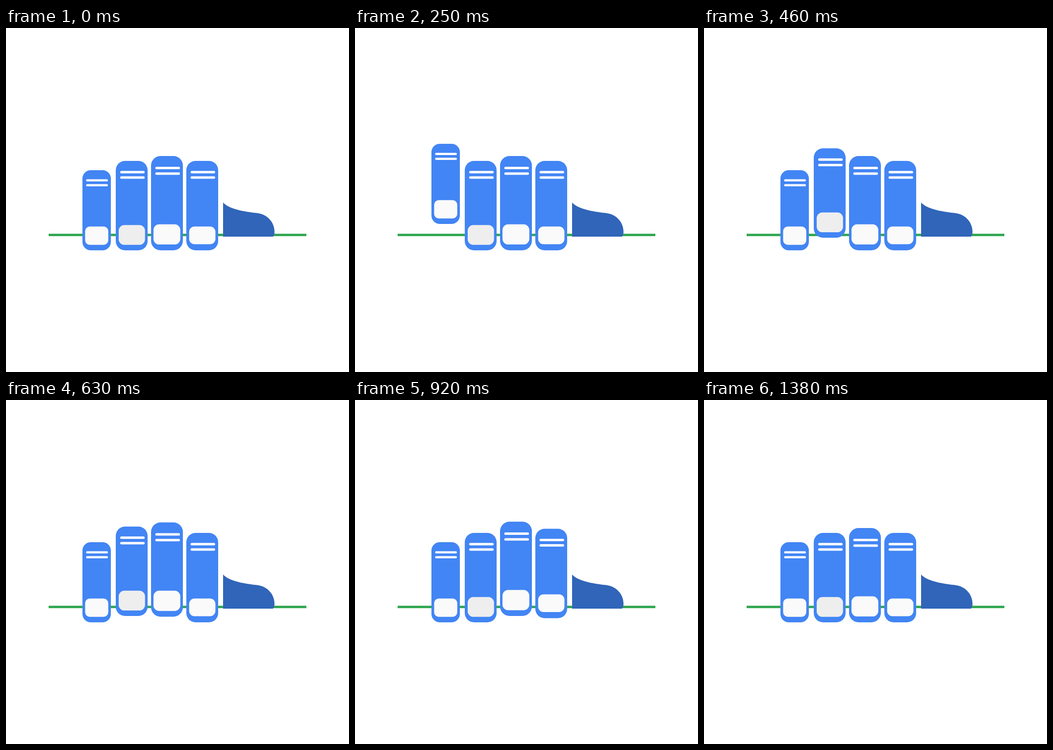
An HTML page that plays this animation: 700x704 px, repeating every 1540 ms.

```html
<!DOCTYPE html>
<html lang="en">
<head>
<meta charset="utf-8">
<title>Drumming fingers</title>
<style>
  html, body { margin: 0; height: 100%; overflow: hidden; background: #fff; }
  svg { display: block; }
</style>
</head>
<body>
<svg id="stage" width="700" height="704" viewBox="0 0 700 704">
  <rect x="87" y="421" width="526" height="5" fill="#34a853"/>
  <path fill="#3065b9" d="M443 357C455 371 487 376 514 379C535 382 548 399 548 417Q548 423 545 427H443Z"/>
</svg>
<script>
const LOOP = 1540, FPS = 24, BOTTOM = 455;

// Boxes are [x, y, width, height]; start, peak and end count ticks of 1/24 s.
const fingers = [
  { x: 156, y: 291, w: 58, r: 17, lines: [163.5, 309.5, 44.5, 4.4], gap: 10,
    nail: [161.5, 406.3, 47.2, 37.5], nailR: 9.5, lift: 54, start: 0, peak: 6, end: 11 },
  { x: 224, y: 272, w: 65, r: 19, lines: [233, 292.4, 50, 5], gap: 11.2,
    nail: [230, 403.3, 53.7, 40.5], nailR: 11.5, shade: '#eee', lift: 28.5, start: 6, peak: 12.2, end: 17.5 },
  { x: 296, y: 262, w: 65, r: 19.5, lines: [304.7, 284, 50.3, 5], gap: 11.6,
    nail: [301, 401.8, 54.7, 41.3], nailR: 11.5, lift: 30, start: 12.5, peak: 18.45, end: 24.95 },
  { x: 368, y: 272, w: 65, r: 19, lines: [376.6, 292.4, 50.2, 5], gap: 11.2,
    nail: [373.8, 406.2, 53.6, 36.2], nailR: 11, lift: 29.2, start: 19, peak: 27.4, end: 33 }
];

const stage = document.getElementById('stage');

function add(parent, tag, attrs = {}) {
  const node = document.createElementNS(stage.namespaceURI, tag);
  for (const key in attrs) node.setAttribute(key, attrs[key]);
  return parent.appendChild(node);
}

function addRect(parent, [x, y, width, height], rx, fill) {
  add(parent, 'rect', { x, y, width, height, rx, fill });
}

for (const f of fingers) {
  f.node = add(stage, 'g');
  addRect(f.node, [f.x, f.y, f.w, BOTTOM - f.y], f.r, '#4285f4');
  const [x, y, w, h] = f.lines;
  for (const top of [y, y + f.gap]) addRect(f.node, [x, top, w, h], h / 2, '#fff');
  addRect(f.node, f.nail, f.nailR, f.shade || '#fafafa');
}

function ease(from, to, tick) {
  const t = Math.min(1, Math.max(0, (tick - from) / (to - from)));
  return t * t * (3 - 2 * t);
}

function draw(now) {
  const tick = Math.floor((now % LOOP + 5) * FPS / 1000);
  for (const f of fingers) {
    const rise = f.lift * (ease(f.start, f.peak, tick) - ease(f.peak, f.end, tick));
    f.node.setAttribute('transform', `translate(0 ${-rise})`);
  }
}

let origin;
function loop(now) {
  origin ??= now;
  draw(now - origin);
  requestAnimationFrame(loop);
}
draw(0);
requestAnimationFrame(loop);
</script>
</body>
</html>
```
